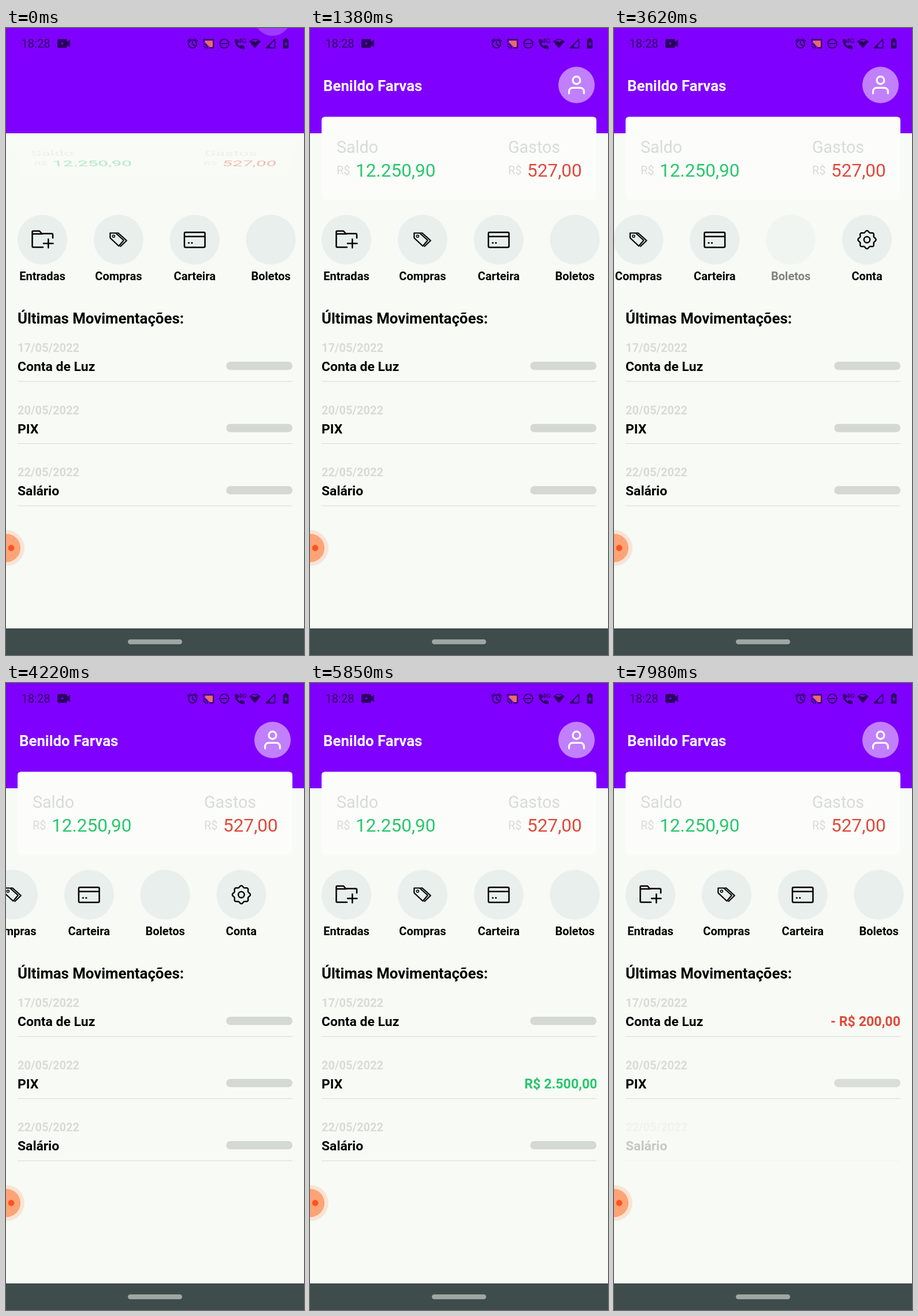
These frames come from a looping animation (516 by 1084 pixels, 8 s). An HTML page with a canvas:

```html
<!DOCTYPE html>
<html lang="pt-BR">
<head>
<meta charset="utf-8">
<title>Finanças</title>
<style>
html, body { margin: 0; width: 100%; height: 100%; overflow: hidden; background: #f7faf5; }
canvas { position: absolute; display: block; }
#screen { left: 0; top: 0; }
#card { left: 20px; top: 153px; }
</style>
</head>
<body>
<canvas id="screen" width="516" height="1084"></canvas>
<canvas id="card" width="476" height="144"></canvas>
<script>
const LOOP = 8000, DP = 516 / 360;
const GREEN = '#2ac66c', RED = '#e0493a', GREY = '#d8dbd6', DARK = '#2b0060';
const screen = document.getElementById('screen'), card = document.getElementById('card');
const g = screen.getContext('2d');

const clamp = v => Math.max(0, Math.min(1, v));
const inOut = u => u < 0.5 ? 2 * u * u : 1 - 2 * (1 - u) * (1 - u);
const ease = (t, start, length) => inOut(clamp((t - start) / length));

function text(c, str, x, y, size, color, weight = 700, align = 'left') {
  c.font = `${weight} ${size * DP}px Roboto, sans-serif`;
  c.textAlign = align;
  c.fillStyle = color;
  c.fillText(str, x, y);
}
function box(c, x, y, w, h, r, color) {
  c.fillStyle = color;
  c.beginPath();
  c.roundRect(x, y, w, h, r);
  c.fill();
}
function disc(x, y, r, color) {
  g.fillStyle = color;
  g.beginPath();
  g.arc(x, y, r, 0, 7);
  g.fill();
}
function ring(x, y, r, color, width) {
  g.strokeStyle = color;
  g.lineWidth = width;
  g.beginPath();
  g.arc(x, y, r, 0, 7);
  g.stroke();
}
function line(d, color, width) {
  g.strokeStyle = color;
  g.lineWidth = width;
  g.stroke(new Path2D(d));
}
function fill(d, color) {
  g.fillStyle = color;
  g.fill(new Path2D(d));
}
function at(x, y, alpha, draw) {
  g.save();
  g.translate(x, y);
  g.globalAlpha = alpha;
  draw();
  g.restore();
}

// Touch feedback: dims at once, recovers in 250 ms after release
function dim(t, press, release) {
  if (t < press) return 1;
  return 0.2 + 0.8 * ease(t, release, 250);
}

const icons = {
  folder() {
    line('M1 13H-16Q-17.5 13-17.5 11.500V-13.500Q-17.5-15-16-15H-5L-1-10.5H16.500Q18-10.5 18-9V-3', '#000', 2.5);
    line('M-17-10H0M2 6.5H18.5M10.3-1V14', '#000', 2.5);
  },
  tags() {
    line('M-14.500-11.500H-5L9 1L.5 11L-14.500-3Z', '#000', 2.2);
    line('M-3.500-11.500H-.500L14 1.500L3.5 11.5', '#000', 2.2);
    ring(-8.5, -6, 2, '#000', 1.6);
  },
  wallet() {
    g.beginPath();
    g.roundRect(-17.8, -12.8, 35.6, 26, 2);
    g.strokeStyle = '#000';
    g.lineWidth = 2.5;
    g.stroke();
    line('M-17-5.5H17', '#000', 2.5);
    disc(-10.3, 5.5, 1.6, '#000');
    disc(-4.8, 5.5, 1.6, '#000');
  },
  gear() {
    g.beginPath();
    for (let i = 0; i < 96; i++) {
      const a = i / 96 * 2 * Math.PI, r = 14.2 + 1.4 * Math.cos(8 * a);
      g.lineTo(r * Math.sin(a), -r * Math.cos(a));
    }
    g.closePath();
    g.strokeStyle = '#000';
    g.lineWidth = 2.4;
    g.stroke();
    ring(0, 0, 5.2, '#000', 2.4);
  }
};

const actions = [
  { label: 'Entradas', icon: icons.folder },
  { label: 'Compras', icon: icons.tags },
  { label: 'Carteira', icon: icons.wallet },
  { label: 'Boletos', press: 3470, release: 3517 },
  { label: 'Conta', icon: icons.gear }
];

const HOLD = 108;
const moves = [
  { date: '17/05/2022', label: 'Conta de Luz', value: '- R$ 200,00', color: RED, taps: [6280] },
  { date: '20/05/2022', label: 'PIX', value: 'R$ 2.500,00', color: GREEN, taps: [5280, 7520] },
  { date: '22/05/2022', label: 'Salário', value: 'R$ 7.250,00', color: GREEN, taps: [7865] }
];

function paintCard() {
  const c = card.getContext('2d');
  box(c, 0.1, 0.4, 475.8, 143.4, 5.5, '#fcfdfb');
  const entry = (x, title, value, color) => {
    text(c, title, x, 63, 20, GREY, 400);
    text(c, 'R$', x, 99.5, 14, GREY, 400);
    text(c, value, x + 33, 104, 22, color, 400);
  };
  entry(26, 'Saldo', '12.250,90', GREEN);
  entry(323, 'Gastos', '527,00', RED);
}

function header(t) {
  box(g, 0, 0, 516, 182, 0, '#8000ff');
  const p = ease(t, -382, 800);
  at(0, -150 * DP * (1 - p), p, () => {
    text(g, 'Benildo Farvas', 23 - 300 * DP * (1 - ease(t, 120, 800)), 108.5, 18, '#fff');
    disc(461.5, 98.5, 31.5, 'rgba(255,255,255,.5)');
    g.translate(442.1, 79.1);
    g.scale(1.6125, 1.6125);
    line('M20 21v-2a4 4 0 0 0-4-4H8a4 4 0 0 0-4 4v2', '#fff', 2);
    ring(12, 7, 4, '#fff', 2);
  });
}

function scrollX(t) {
  const fling = start => 1 - (1 - clamp((t - start) / 280)) ** 4;
  return 183 * (fling(3520) - fling(4330));
}

function menu(t) {
  const offset = scrollX(t);
  actions.forEach((a, i) => {
    const alpha = a.press ? dim(t, a.press, a.release) : 1;
    at(63 + i * 92 * DP - offset, 366, alpha, () => {
      disc(0, 0, 30 * DP, '#e9efed');
      text(g, a.label, 0, 70, 14, '#000', 700, 'center');
      if (a.icon) a.icon();
    });
  });
}

function movement(m, i, t) {
  const done = m.taps.filter(p => t >= p + HOLD).length;
  const press = m.taps.filter(p => t >= p).pop();
  const alpha = press === undefined ? 1 : dim(t, press, press + HOLD);
  at(0, i * 75 * DP, alpha, () => {
    text(g, m.date, 20, 560, 14, GREY);
    text(g, m.label, 20, 593, 16, '#000');
    box(g, 20, 610.6, 476, 1, 0, '#d7dad5');
    g.beginPath();
    g.rect(20, 565, 476, 40);
    g.clip();
    const k = done ? ease(t, m.taps[done - 1] + HOLD, 500) : 1;
    if (done % 2) {
      text(g, m.value, 496 + 100 * DP * (1 - k), 593, 16.2, m.color, 700, 'right');
    } else {
      g.globalAlpha = alpha * k;
      box(g, 381.3, 577, 114.7, 14.3, 7.1, '#d5d9d3');
    }
  });
}

function statusBar() {
  text(g, '18:28', 26.5, 34, 14, DARK, 400);
  box(g, 89, 19, 17, 15.5, 2.5, DARK);
  fill('M105 25L111 20V33L105 29Z', DARK);
  disc(97.5, 26.7, 2, '#7000df');

  ring(323, 27.5, 7, DARK, 2);
  line('M323 23.5V28L326.5 30M314.5 22.5L319 18.7M331.5 22.5L327 18.7', DARK, 1.8);

  fill('M345 22H358V33H353L345 25Z', '#ee6b62');
  line('M342 24V20H359V34.5H353M342 27.5A7.5 7.5 0 0 1 349 35M342 31.5A4 4 0 0 1 345.5 35', DARK, 1.9);

  ring(378, 27, 7.7, DARK, 2);
  line('M373.5 27H382.5', DARK, 2);

  line('M398 21Q398 33 411 35', DARK, 3.2);
  line('M397 20.5H400.5L401.5 25M406.5 31L412 32V35.5', DARK, 2.4);
  text(g, '4G', 402, 26, 8.2, DARK, 500);

  fill('M431 35L421 23Q431 14.500 441 23Z', DARK);
  fill('M431 24.500L425 22Q431 18.500 437 22Z', '#7400e8');
  line('M450.500 34.500L465.500 19.500V34.500Z', DARK, 1.8);
  fill('M450.500 34.500L457 28V34.500Z', DARK);

  box(g, 479.5, 19.5, 10, 16, 1.5, DARK);
  box(g, 482, 17.5, 5, 3, 0.5, DARK);
  fill('M485.500 22L482 28.500H484.200V33L487.500 26.500H485.500Z', '#7c00f6');
}

function bubble() {
  disc(0.7, 899, 31.2, '#f9e4d5');
  disc(0.7, 899, 24.4, '#fca477');
  disc(9, 899, 5.4, '#fc5422');
}

function render(t) {
  box(g, 0, 0, 516, 1084, 0, '#f7faf5');
  header(t);
  menu(t);
  text(g, 'Últimas Movimentações:', 20, 511, 18, '#000');
  moves.forEach((m, i) => movement(m, i, t));
  bubble();
  statusBar();
  box(g, 0, 1038, 516, 46, 0, '#3e4c4c');
  box(g, 211, 1058, 94, 9, 4.5, '#364343');
  box(g, 211, 1057, 94, 8.5, 4.2, '#a0a6a4');

  const p = ease(t, -380, 900);
  card.style.opacity = p;
  card.style.transform = p < 1 ? `perspective(1700px) rotateX(${-100 * (1 - p)}deg)` : 'none';
}

g.lineCap = g.lineJoin = 'round';
paintCard();
const begin = performance.now();
function tick() {
  render((performance.now() - begin) % LOOP);
  requestAnimationFrame(tick);
}
tick();
</script>
</body>
</html>
```
